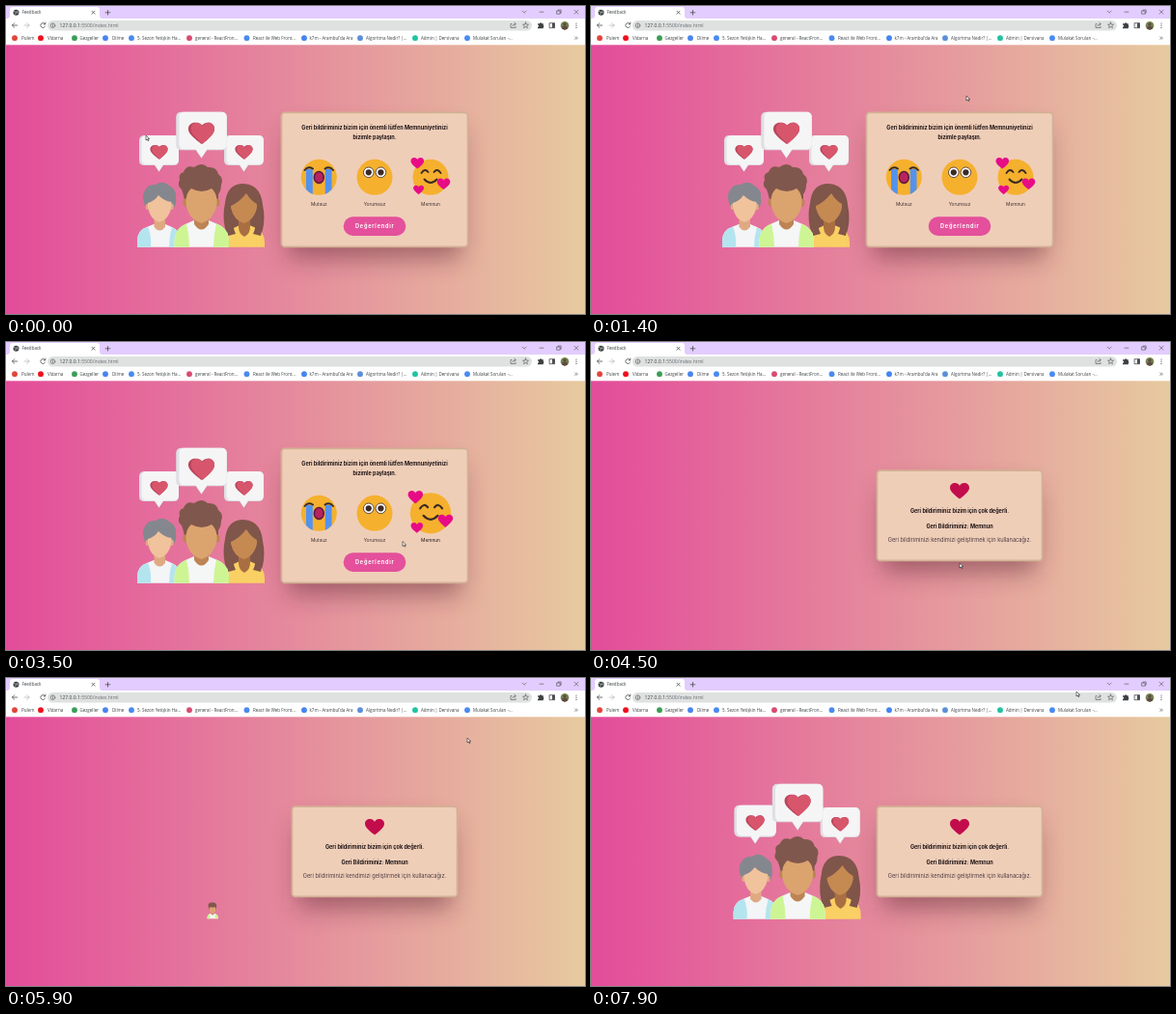
Write an HTML page that moves like this. It is 600 px wide and 319 px high and loops after 8 s.

```html
<!DOCTYPE html>
<html lang="tr">
<head>
<meta charset="utf-8">
<title>Feedback</title>
<style>
html, body { margin: 0; width: 100%; height: 100%; overflow: hidden; }
svg { display: block; width: 100vw; height: 100vh; }
text { font-family: Inter, "Noto Sans", sans-serif; }
.ui text { font-family: "Open Sans", "Noto Sans", sans-serif; font-size: 4.5px; fill: #3c4043; }
.line { fill: none; stroke: #4a4d51; stroke-width: .8; stroke-linecap: round; stroke-linejoin: round; }
.thin { stroke-width: .6; }
.bold { font-size: 5.5px; font-weight: 650; fill: #1c1214; text-anchor: middle; }
.label { font-size: 4.8px; fill: #1c1214; text-anchor: middle; }
.card { fill: #efceb8; stroke: #d3b095; stroke-width: 1.8; }
.shadow { fill: #5a2030; opacity: .5; filter: url(#blur); }
.face { fill: none; stroke: #3b2a26; stroke-width: 1.9; stroke-linecap: round; }
</style>
</head>
<body>
<svg viewBox="0 0 600 319" preserveAspectRatio="none">
  <defs>
    <linearGradient id="page"><stop stop-color="#e34c9a"/><stop offset="1" stop-color="#e7ca9f"/></linearGradient>
    <filter id="blur" x="-30%" y="-50%" width="160%" height="200%"><feGaussianBlur stdDeviation="13"/></filter>
    <path id="heart" d="M0 .85C-.35 .55-1 .1-1-.35C-1-.65-.75-.85-.5-.85C-.25-.85-.08-.72 0-.55C.08-.72 .25-.85 .5-.85C.75-.85 1-.65 1-.35C1 .1 .35 .55 0 .85Z"/>
  </defs>

  <rect y="40" width="600" height="279" fill="url(#page)"/>

  <g class="ui">
    <rect width="600" height="14" fill="#e3ccff"/>
    <path d="M1 13Q4 13 4 10V4Q4 1 7 1H94Q97 1 97 4V10Q97 13 100 13V14H1Z" fill="#fff"/>
    <rect y="13" width="600" height="27.3" fill="#fff"/>
    <circle cx="10.5" cy="6.8" r="3" fill="#3c4043"/>
    <path d="M8.5 5.5L10.5 6.5L9.8 8.3M12 4.8L11.4 6.5L12.8 7.4" class="line" style="stroke:#fff;stroke-width:.5"/>
    <text x="16.5" y="8.4">Feedback</text>
    <path class="line" d="M89 5.2L92 8.2M92 5.2L89 8.2M103.2 6.8H107.8M105.5 4.5V9.1"/>
    <path class="line thin" d="M535.3 5.2L537.2 7.1L539.1 5.2M553 6.2H557M571 5H574.2V8.2H571ZM572 5V4H575.2V7.2H574.2M589 4.2L593 8.2M593 4.2L589 8.2"/>
    <rect x="43" y="15" width="502" height="10.4" rx="5.2" fill="#dfe1e1"/>
    <path class="line" d="M11.5 20H6.5M8.7 17.7L6.4 20L8.7 22.3"/>
    <path class="line" style="stroke:#b8babd" d="M19 20H24M21.8 17.7L24.1 20L21.8 22.3"/>
    <path class="line" d="M40.4 18.5A2.5 2.5 0 1 0 40.5 21.3M40.8 17V18.9H39"/>
    <circle class="line thin" cx="48.5" cy="20.2" r="2.3"/>
    <path class="line thin" d="M48.5 20V21.4M48.5 19V19.1"/>
    <text x="55.5" y="22" style="font-size:5.05px">127.0.0.1<tspan fill="#686c70">:5500/index.html</tspan></text>
    <path class="line thin" d="M524 18.5H523V22.5H528V21M524.7 20.8Q525 18.8 528 18.6M526.8 17.3L528.3 18.6L526.8 19.9"/>
    <path class="line thin" d="M538.5 17L539.3 19.1L541.5 19.2L539.8 20.6L540.4 22.7L538.5 21.5L536.6 22.7L537.2 20.6L535.5 19.2L537.7 19.1Z"/>
    <path d="M551 18.2H553A1.2 1.2 0 0 1 555.3 18.2H556.8V20A1.1 1.1 0 0 1 556.8 22V23.2H551V21.800A1.100 1.100 0 0 0 551 19.600Z" fill="#3c4043"/>
    <rect class="line" x="563.5" y="17.7" width="5" height="5"/>
    <rect x="566" y="17.7" width="2.6" height="5" fill="#4a4d51"/>
    <circle cx="579" cy="20.2" r="4.3" fill="#75804f"/>
    <path d="M576 23.2Q576 20.8 579 20.8Q582 20.8 582 23.2A4.3 4.3 0 0 1 576 23.2Z" fill="#5d4a42"/>
    <circle cx="579" cy="19" r="1.7" fill="#5d4a42"/>
    <g fill="#4a4d51"><circle cx="591" cy="18" r=".6"/><circle cx="591" cy="20.2" r=".6"/><circle cx="591" cy="22.4" r=".6"/></g>
    <g id="marks"></g>
    <path class="line thin" d="M589.8 32L591 33.2L589.8 34.4M591.3 32L592.5 33.2L591.3 34.4"/>
  </g>

  <g id="crowd">
    <g id="bubbles"></g>
    <g id="left">
      <path d="M136 249.7V243Q136 232 147 228.500L153 226H165L171 228.500Q181 232 181 245V249.7Z" fill="#f4f5f7"/>
      <path d="M136 249.7V243Q136 232 147 228.500Q151 238 150 249.7ZM181 249.7V245Q181 234 172 229Q169 239 169 249.7Z" fill="#b4e5ee"/>
      <path d="M153.500 216H165V229Q159 236 153.500 229Z" fill="#dfa982"/>
      <path d="M144 207Q140 196 144 191Q147 184 155 185Q163 180 169 186Q177 190 176 198Q177 205 174 209H146Z" fill="#85878f"/>
      <ellipse cx="146.500" cy="208" rx="1.800" ry="3.2" fill="#dfa982"/><ellipse cx="172" cy="208" rx="1.800" ry="3.2" fill="#dfa982"/>
      <path d="M147 204Q154 202 158 196Q164 202 171.500 203V208Q169 221 159 224Q149 221 147 208Z" fill="#f0c39c"/>
    </g>
    <g id="right">
      <path d="M230 240Q223 222 227 204Q229 184 246 184Q264 185 266 206Q270 225 263 240Z" fill="#80554a"/>
      <path d="M224.500 249.7V243Q226 233 238 229L242 227H252L257 229Q268 233 268 245V249.7Z" fill="#fad064"/>
      <path d="M241 218H253V229Q253 236 247 239Q241 236 241 229Z" fill="#a96f42"/>
      <path d="M230 238Q225 219 229 204H235Q233 226 238 236ZM264 238Q269 219 264 204H258Q261 226 256 236Z" fill="#80554a"/>
      <path d="M233 207Q242 203 249 194Q254 202 260 205V209Q257 222 246.500 225Q236 222 233 209Z" fill="#c48a51"/>
    </g>
    <g id="center">
      <path d="M174.500 249.700V243Q175 230 188 225L195 222H210L217 225Q231 230 231 244V249.700Z" fill="#f5f6f6"/>
      <path d="M174.500 249.700V243Q175 230 187 225.500Q190 238 190 249.700ZM231 249.700V244Q231 230 218 225.500Q215 238 215 249.700Z" fill="#cdf594"/>
      <path d="M195 214H210V226Q202.500 237 195 226Z" fill="#bd8455"/>
      <path d="M185 201Q184 195 182 190Q177 186 180 180Q178 174 184 172Q187 164 195 167Q203 161 209 167Q218 166 220 174Q226 179 223 185Q223 191 220 195V201Z" fill="#80574c"/>
      <ellipse cx="186" cy="203.500" rx="2.400" ry="4" fill="#bd8455"/><ellipse cx="219" cy="203.500" rx="2.400" ry="4" fill="#bd8455"/>
      <path d="M186.500 201Q187 193 192 189Q203 195 213 189Q218 193 218.500 201V205Q216 221 202.500 225Q189 221 186.500 205Z" fill="#dba36e"/>
    </g>
  </g>

  <g id="form">
    <rect class="shadow" x="292" y="130" width="180" height="131" rx="5"/>
    <rect class="card" x="285.400" y="110.300" width="193.200" height="139" rx="3.500"/>
    <text class="bold" x="382" y="128.400">Geri bildiriminiz bizim için önemli lütfen Memnuniyetinizi</text>
    <text class="bold" x="382" y="137.700">bizimle paylaşın.</text>
    <g id="sad">
      <circle cx="324.300" cy="177.300" r="18.500" fill="#f5b02e"/>
      <path d="M311 169H317.800V195Q314 193.500 311 190ZM330.800 169H337.500V190Q334 193.500 330.800 195Z" fill="#5492ee"/>
      <path class="face" d="M309.500 170Q313 165.500 318 168.500M330.500 168.500Q335.500 165.500 339 170"/>
      <ellipse cx="324.300" cy="177.500" rx="5" ry="6" fill="#b8235f" stroke="#5a1a3c" stroke-width="1.500"/>
    </g>
    <g id="neutral">
      <circle cx="382" cy="177.300" r="18.500" fill="#f5b02e"/>
      <g fill="#fff" stroke="#3b2a26" stroke-width=".8"><circle cx="375.800" cy="172.300" r="5.300"/><circle cx="388.400" cy="172.300" r="5.300"/></g>
      <circle cx="375.800" cy="172.300" r="3.100" fill="#3b2a26"/><circle cx="388.400" cy="172.300" r="3.100" fill="#3b2a26"/>
    </g>
    <g id="happy">
      <circle cx="440" cy="177.300" r="18.500" fill="#f5b02e"/>
      <path class="face" d="M430.500 173Q434 167.500 437.500 172M443.500 172Q447 167.500 450.500 173M433.500 179.500Q440 186.500 446.500 179.500"/>
      <g fill="#e70c86">
        <use href="#heart" transform="translate(426.300 162.800) scale(6.800)"/>
        <use href="#heart" transform="translate(453.500 184.300) scale(6.800)"/>
        <use href="#heart" transform="translate(427.600 190.500) scale(5.500)"/>
      </g>
    </g>
    <text class="label" id="sadText" x="324.300" y="207">Mutsuz</text>
    <text class="label" id="neutralText" x="382" y="207">Yorumsuz</text>
    <text class="label" id="happyText" x="440" y="207">Memnun</text>
    <rect x="349.700" y="218.300" width="64.600" height="19.600" rx="9.800" fill="#e4509b"/>
    <text class="bold" x="382.300" y="230" style="fill:#fff;letter-spacing:.8px">Değerlendir</text>
  </g>

  <g id="thanks">
    <rect class="shadow" x="302" y="151" width="160" height="87" rx="5"/>
    <rect class="card" x="296.400" y="133.200" width="171.200" height="93.200" rx="3.500"/>
    <use href="#heart" transform="translate(382 154.300) scale(10 9.700)" fill="#c20c4b"/>
    <text class="bold" x="382" y="176.500">Geri bildiriminiz bizim için çok değerli.</text>
    <text class="bold" x="382" y="193.100">Geri Bildiriminiz: Memnun</text>
    <text class="label" x="382" y="207.300" style="font-size:5.68px;fill:#503c42">Geri bildiriminizi kendimizi geliştirmek için kullanacağız.</text>
  </g>

  <g id="cursor" stroke="#222" stroke-width=".6" fill="#fff" stroke-linejoin="round">
    <path id="arrow" d="M0 0V5L1.200 3.900L2 5.700L2.900 5.300L2.100 3.600H3.700Z"/>
    <path id="hand" d="M-.5 0Q.4-.8 .9 0V2.200L3.500 2.800Q4.200 3.200 3.900 5L3.300 6.800H.3L-1.700 4Q-1.400 3-.5 3.700Z"/>
  </g>
</svg>

<script>
const LOOP = 8000, STEP = 100, SENT = 3900;
const $ = id => document.getElementById(id);

// icon x, text x, icon colour, title
const marks = [
  [9, 16, '#e2453a', 'Pulem'],
  [36, 43, '#f00f1c', 'Vidarna'],
  [71, 76.5, '#3a9f58', 'Gezgeller'],
  [103, 110, '#4a84ee', 'Dilme'],
  [130, 136, '#4a8af0', '5. Sezon Yetişkin Ha...'],
  [190, 196, '#d94b70', 'general - ReactFron...'],
  [249.5, 256, '#4a8af0', 'React ile Web Front...'],
  [309, 314.5, '#4285f4', "k7m - Arambul'da Ara"],
  [367, 373, '#5b8fd8', 'Algoritma Nedir? |...'],
  [424, 430, '#22c3a0', 'Admin | Dersivana'],
  [478, 484, '#4a8af0', 'Mulakat Soruları -...']
];
$('marks').innerHTML = marks.map(([icon, x, color, title]) =>
  `<circle cx="${icon}" cy="33.2" r="2.9" fill="${color}"/><text x="${x}" y="34.9">${title}</text>`).join('');

// Speech bubble centred on x, body from y, with its tail below
function bubble(id, x, y, w, h, size) {
  const r = x + w / 2, tail = w * .11, c = 5.5;
  const body = (l, b, fill) => `<path fill="${fill}" d="M${l + c} ${y}H${r - c}Q${r} ${y} ${r} ${y + c}V${b - c}Q${r} ${b} ${r - c} ${b}` +
    `H${x + tail}L${x} ${b + tail * 1.5}L${x - tail} ${b}H${l + c}Q${l} ${b} ${l} ${b - c}V${y + c}Q${l} ${y} ${l + c} ${y}Z"/>`;
  const heart = (dx, s, fill) => `<use href="#heart" fill="${fill}" transform="translate(${x + dx} ${y + h * .56}) scale(${s} ${size * .96})"/>`;
  return `<g id="${id}">${body(x - w / 2, y + h, '#dfe0e4')}${body(x - w * .44, y + h - 1, '#f5f5f6')}` +
    `${heart(0, size, '#b9445b')}${heart(size * .1, size * .9, '#d7566c')}</g>`;
}
$('bubbles').innerHTML = bubble('bubbleL', 158.5, 134, 41, 31, 9.1) +
  bubble('bubbleR', 246.5, 134, 41, 31, 9.1) + bubble('bubbleC', 202.5, 109.7, 52.5, 39.5, 13.6);

const clamp = u => Math.max(0, Math.min(1, u));
const smooth = u => u * u * (3 - 2 * u);
const ramp = (t, start, length) => smooth(clamp((t - start) / length));
const scaleAt = (id, x, y, s) =>
  $(id).setAttribute('transform', `translate(${x} ${y}) scale(${s}) translate(${-x} ${-y})`);
const show = (id, on) => $(id).setAttribute('visibility', on ? 'visible' : 'hidden');

// time, x, y
const path = [
  [0, 145, 134], [200, 145, 134], [1300, 389, 93], [1500, 389, 93], [1900, 326, 180], [2200, 328, 182],
  [2500, 388, 182], [2700, 388, 182], [3100, 440, 182], [3300, 440, 184], [3700, 382, 229],
  [4600, 382, 229], [5900, 478, 62], [6400, 503, 14], [8000, 503, 14]
];
function pointer(t) {
  const i = Math.max(1, path.findIndex(p => p[0] > t));
  const [t0, x0, y0] = path[i - 1], [t1, x1, y1] = path[i];
  const u = ramp(t, t0, t1 - t0);
  return [x0 + (x1 - x0) * u, y0 + (y1 - y0) * u];
}

// id, centre x, hover start, hover end
const moods = [['sad', 324.3, 1750, 2250], ['neutral', 382, 2300, 2800], ['happy', 440, 2900, 3450]];
// id, anchor x, anchor y, time it starts to grow
const parts = [
  ['center', 202.5, 249, 5800], ['left', 158.5, 249, 5980], ['right', 246.5, 249, 5980],
  ['bubbleC', 202.5, 157, 6150], ['bubbleL', 158.5, 171, 6250], ['bubbleR', 246.5, 171, 6250]
];

function draw(t) {
  const sent = t >= SENT;
  show('form', !sent);
  show('thanks', sent);
  show('crowd', !sent || t > 5800);
  $('crowd').setAttribute('transform', `translate(${sent ? 11.6 : 0} 0)`);

  const swell = sent ? ramp(t, 7300, 500) : ramp(t, 2100, 500) * (1 - ramp(t, 2700, 500));
  for (const [id, x, y, start] of parts) {
    const grown = sent ? ramp(t, start, 350) : 1;
    scaleAt(id, x, y, id === 'bubbleL' ? grown + .06 * swell : grown);
  }

  for (const [id, x, start, end] of moods) {
    const hover = ramp(t, start, 200) * (1 - ramp(t, end, 200));
    scaleAt(id, x, 177.3, 1 + .17 * hover);
    $(id + 'Text').setAttribute('opacity', .82 + .18 * hover);
  }

  const [x, y] = pointer(t);
  const hand = !sent && (t >= 3600 || moods.some(m => Math.hypot(x - m[1], y - 177.3) < 19));
  show('arrow', !hand);
  show('hand', hand);
  $('cursor').setAttribute('transform', `translate(${x} ${y})`);
}

const begin = performance.now();
function tick() {
  const t = (performance.now() - begin) % LOOP;
  draw(Math.floor(t / STEP) * STEP);
  requestAnimationFrame(tick);
}
tick();
</script>
</body>
</html>
```
